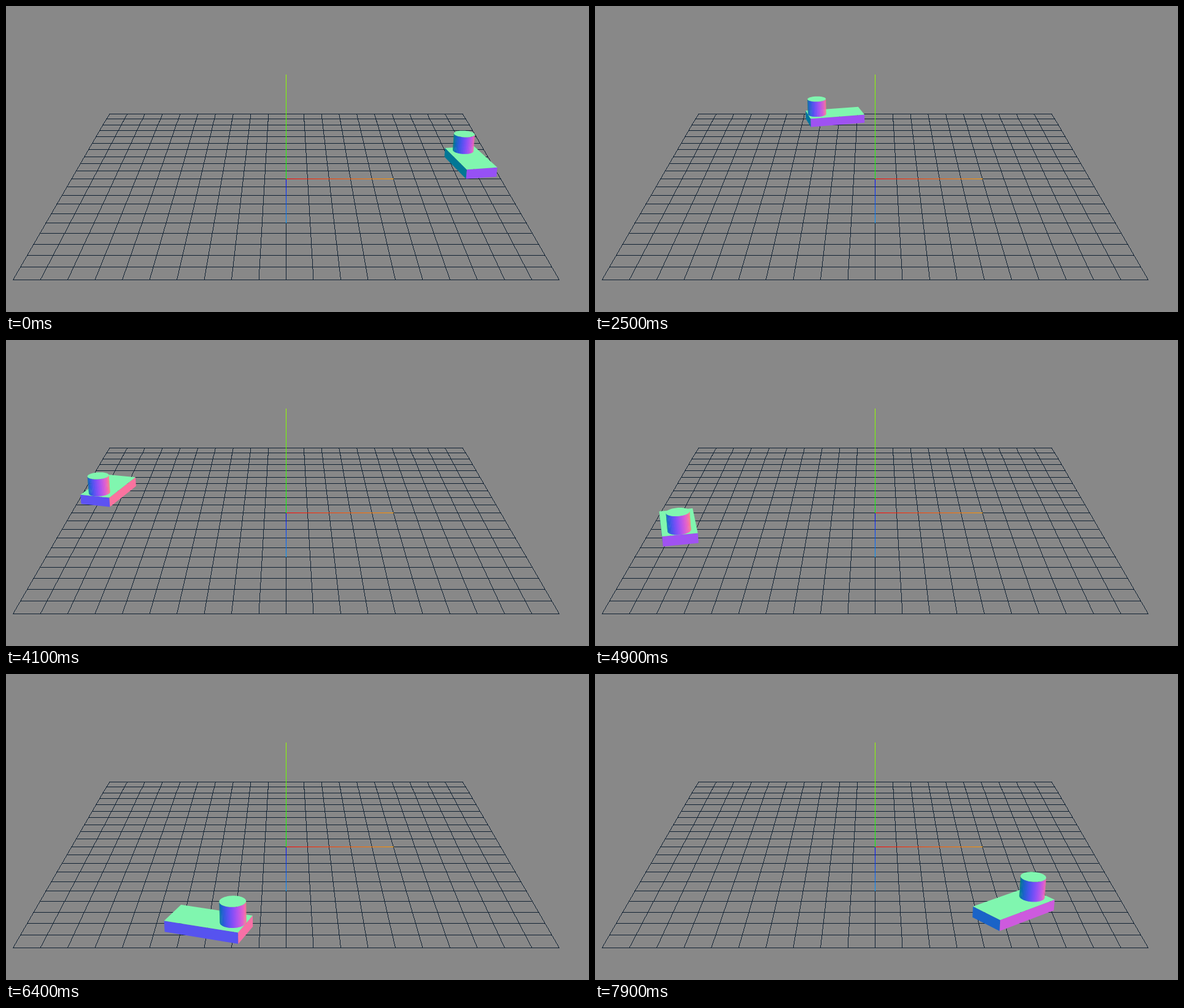
Recreate the animation shown at these times as an HTML page with a canvas. Size 950x500 px, loop 8 s.

```html
<!DOCTYPE html>
<html lang="en">
<head>
<meta charset="utf-8">
<title>Vehicle circling on a grid</title>
<style>
  html, body { margin: 0; width: 100%; height: 100%; overflow: hidden; background: #888; }
  canvas { display: block; }
</style>
</head>
<body>
<canvas id="stage" width="950" height="500"></canvas>
<script>
const ctx = document.getElementById('stage').getContext('2d');
const TAU = 2 * Math.PI, RAD = Math.PI / 180;

// Camera: pitched down, aimed at the world origin
const SIN = 0.37, COS = 0.929, DIST = 43.27, FOCAL = 34.95 * DIST;
const CX = 456.5, CY = 282.5;

// Vehicle: body length, width, height; turret radius, offset and top
const ORBIT = 9, LEN = 3, WID = 1.5, HGT = 0.47;
const TUR_R = 0.5, TUR_X = 1, TUR_TOP = 1.33, SIDES = 72;

function project([x, y, z]) {
  const k = FOCAL / (DIST - z * COS - y * SIN);
  return [CX + k * x, CY + k * (z * SIN - y * COS)];
}

// Surface colour from the normal as seen by the camera
function normalColor(x, y, z) {
  const view = [x, y * COS - z * SIN, y * SIN + z * COS];
  return `rgb(${view.map(v => Math.round(127.5 + 127.5 * v))})`;
}

// Hard-edged one pixel line, optionally fading between two colours
function line(c, from, to, rgb0, rgb1 = rgb0) {
  const [x0, y0] = project(from), [x1, y1] = project(to);
  const n = Math.ceil(Math.max(Math.abs(x1 - x0), Math.abs(y1 - y0)));
  for (let i = 0; i <= n; i++) {
    const u = i / n;
    c.fillStyle = `rgb(${rgb0.map((v, j) => Math.round(v + (rgb1[j] - v) * u))})`;
    c.fillRect(Math.floor(x0 + (x1 - x0) * u), Math.floor(y0 + (y1 - y0) * u), 1, 1);
  }
}

function layer(paint) {
  const canvas = document.createElement('canvas');
  canvas.width = 950;
  canvas.height = 500;
  paint(canvas.getContext('2d'));
  return canvas;
}

const grid = layer(c => {
  c.fillStyle = '#888';
  c.fillRect(0, 0, 950, 500);
  const ink = [17, 34, 51];
  for (let i = -10; i <= 10; i++) {
    line(c, [-10, 0, i], [10, 0, i], ink);
    line(c, [i, 0, -10], [i, 0, 10], ink);
  }
});

const axes = layer(c => {
  const o = [0, 0, 0];
  line(c, o, [5, 0, 0], [255, 0, 0], [255, 153, 0]);
  line(c, o, [0, 0, 5], [0, 0, 255], [0, 153, 255]);
  line(c, o, [0, 5, 0], [0, 255, 0], [153, 255, 0]);
});

function polygon(points, color) {
  ctx.fillStyle = color;
  ctx.beginPath();
  for (const p of points) ctx.lineTo(...project(p));
  ctx.fill();
}

// Upright wall over a ground edge, drawn only when it faces the camera
function wall([x0, z0], [x1, z1], low, high, nx, nz) {
  const toCamX = -(x0 + x1) / 2, toCamZ = DIST * COS - (z0 + z1) / 2;
  if (nx * toCamX + nz * toCamZ <= 0) return;
  polygon([[x0, low, z0], [x1, low, z1], [x1, high, z1], [x0, high, z0]],
    normalColor(nx, 0, nz));
}

function vehicle(angle) {
  const rx = Math.cos(angle), rz = -Math.sin(angle);   // outward
  const hx = rz, hz = -rx;                             // heading
  const place = (ahead, out) =>
    [rx * (ORBIT + out) + hx * ahead, rz * (ORBIT + out) + hz * ahead];
  const lid = (points, y) =>
    polygon(points.map(([x, z]) => [x, y, z]), normalColor(0, 1, 0));

  const l = LEN / 2, w = WID / 2;
  const base = [place(l, w), place(-l, w), place(-l, -w), place(l, -w)];
  const normals = [[rx, rz], [-hx, -hz], [-rx, -rz], [hx, hz]];
  base.forEach((p, i) => wall(p, base[(i + 1) % 4], 0, HGT, ...normals[i]));
  lid(base, HGT);

  const [tx, tz] = place(TUR_X, 0);
  const rim = i => {
    const a = i / SIDES * TAU;
    return [tx + TUR_R * Math.sin(a), tz + TUR_R * Math.cos(a)];
  };
  const ring = Array.from({ length: SIDES }, (_, i) => rim(i));
  // Strips overlap slightly so that no seams show
  for (let i = -SIDES / 2; i < SIDES / 2; i++) {
    const a = (i + 0.5) / SIDES * TAU;
    wall(rim(i), rim(i + 1.4), HGT, TUR_TOP, Math.sin(a), Math.cos(a));
  }
  lid(ring, TUR_TOP);
}

const start = performance.now();
function frame() {
  const step = Math.floor((performance.now() - start) / 100) % 80;
  ctx.drawImage(grid, 0, 0);
  vehicle((10.3 + 3.76 * step) * RAD);
  ctx.drawImage(axes, 0, 0);
  requestAnimationFrame(frame);
}
frame();
</script>
</body>
</html>
```
